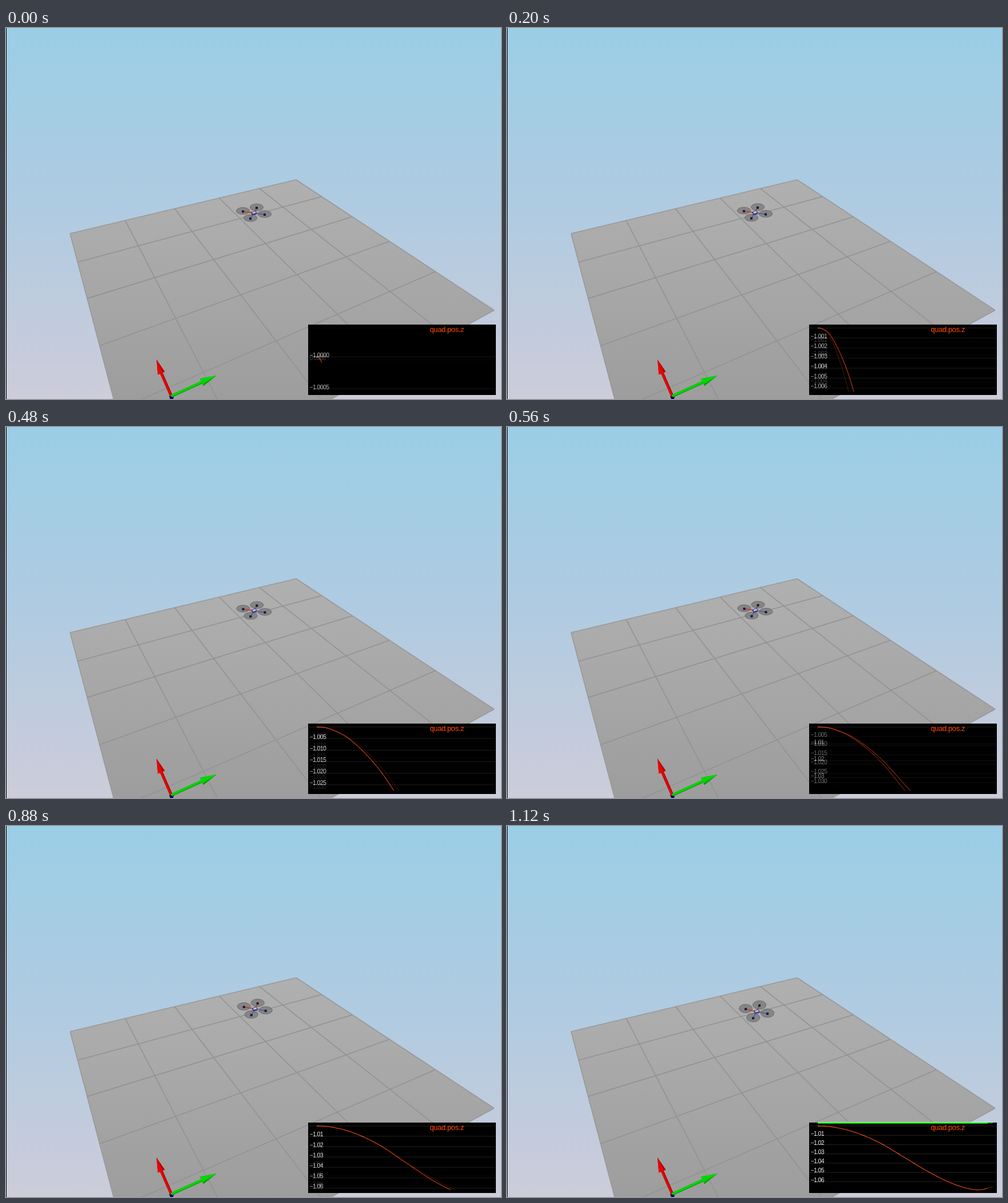
An HTML page with a canvas that plays this animation: 865 px wide and 648 px high, repeating every 1.16 s.

```html
<!DOCTYPE html>
<html lang="en">
<head>
<meta charset="utf-8">
<title>Quadrotor altitude</title>
<style>
html, body { margin: 0; width: 100%; height: 100%; overflow: hidden; background: #000; }
canvas { display: block; }
</style>
</head>
<body>
<canvas id="stage" width="865" height="648"></canvas>
<script>
const W = 865, H = 648, STEP = 40, COUNT = 29;
const ctx = document.getElementById('stage').getContext('2d');

// Smooth curve through [x, y] points
function curve(points) {
  const last = points.length - 1;
  const slope = i => {
    const a = points[Math.max(i - 1, 0)], b = points[Math.min(i + 1, last)];
    return (b[1] - a[1]) / (b[0] - a[0]);
  };
  return x => {
    let i = 0;
    while (i < last - 1 && x > points[i + 1][0]) i++;
    const [x0, y0] = points[i], [x1, y1] = points[i + 1];
    const w = x1 - x0, t = (x - x0) / w, t2 = t * t, t3 = t2 * t;
    const m0 = i ? slope(i) : 0, m1 = slope(i + 1);
    return y0 * (2 * t3 - 3 * t2 + 1) + y1 * (3 * t2 - 2 * t3) +
      w * (m0 * (t3 - 2 * t2 + t) + m1 * (t3 - t2));
  };
}

const climb = curve([[0, 0], [3, .00115], [7, .00637], [12, .018], [17, .0344],
  [22, .0509], [27, .0638], [31, .0688], [34, .0658]]);
const shiftX = curve([[0, 0], [7, .1], [12, .2], [18, .6], [22, 1.1], [27, 1.9], [34, 3.3]]);
const shiftBack = curve([[0, 0], [7, -.5], [12, -1.5], [18, -3], [22, -4.1], [27, -4.2], [34, -.3]]);
const shiftFront = curve([[0, 0], [7, -.5], [12, -1.4], [18, -2.6], [22, -3], [27, -2.3], [34, 3.2]]);

// Simulation tick shown at picture n; fractions blend two ticks
function tickAt(n) {
  if (n < 14) return .75 + 1.2 * n;
  if (n < 18) return 17.55 + .9625 * (n - 14);
  return 21.4 + 1.2 * (n - 18);
}

function poly(points, fill, stroke, width = 1) {
  ctx.beginPath();
  points.forEach(([x, y]) => ctx.lineTo(x, y));
  if (fill) { ctx.closePath(); ctx.fillStyle = fill; ctx.fill(); }
  if (stroke) { ctx.strokeStyle = stroke; ctx.lineWidth = width; ctx.stroke(); }
}

function gradient(y0, y1, ...colors) {
  const g = ctx.createLinearGradient(0, y0, 0, y1);
  colors.forEach((c, i) => g.addColorStop(i / (colors.length - 1), c));
  return g;
}

// Perspective map from the unit square to the floor
function projector([[x0, y0], [x1, y1], [x2, y2], [x3, y3]]) {
  const dx1 = x1 - x2, dy1 = y1 - y2, dx2 = x3 - x2, dy2 = y3 - y2;
  const sx = x0 - x1 + x2 - x3, sy = y0 - y1 + y2 - y3;
  const den = dx1 * dy2 - dx2 * dy1;
  const g = (sx * dy2 - dx2 * sy) / den, h = (dx1 * sy - sx * dy1) / den;
  return (u, v) => {
    const w = 1 + g * u + h * v;
    return [
      (x0 + (x1 - x0 + g * x1) * u + (x3 - x0 + h * x3) * v) / w,
      (y0 + (y1 - y0 + g * y1) * u + (y3 - y0 + h * y3) * v) / w
    ];
  };
}

const corners = [[112, 359], [507, 265], [853, 493], [235.6, 829]];
const floorAt = projector(corners);

function drawFloor() {
  poly(corners, gradient(265, 648, '#b0b0b0', '#a7a7a7', '#9d9d9d'));
  for (let i = 0; i <= 5; i++) {
    const t = i / 5, color = i % 5 ? '#929292' : '#999999';
    poly([floorAt(t, 0), floorAt(t, 1)], null, color, 1.6);
    poly([floorAt(0, t), floorAt(1, t)], null, color, 1.6);
  }
}

function drawArrow(base, neck, tip, half, light, dark) {
  const len = Math.hypot(tip[0] - base[0], tip[1] - base[1]);
  const nx = -(tip[1] - base[1]) / len, ny = (tip[0] - base[0]) / len;
  const off = ([x, y], d) => [x + nx * d, y + ny * d];
  poly([base, neck], null, dark, 5);
  poly([off(base, -.6), off(neck, -.6)], null, light, 3.2);
  poly([off(neck, half), tip, off(neck, -half)], dark);
  poly([off(neck, half * .45), tip, off(neck, -half)], light);
}

function drawAxes() {
  poly([[285, 643], [289, 641], [293, 644], [292, 648], [287, 648]], '#00006e');
  drawArrow([289, 643], [271.5, 603], [263, 579], 6.6, '#e60505', '#b00000');
  drawArrow([289, 643], [342, 619], [368, 607], 7.2, '#05d605', '#08a408');
}

function drawDrone(k) {
  const dx = shiftX(k), back = shiftBack(k), front = shiftFront(k);
  const mid = (back + front) / 2;
  const grow = Math.max(0, k - 22) / 12;
  const rotors = [
    [414 + dx, 319.5 + back], [438 + dx, 313.2 + back],
    [452 + dx, 325 + (mid + front) / 2], [427 + dx, 332 + front]
  ];
  const body = [433 + dx, 323 + mid];
  for (const [x, y] of rotors) {
    ctx.beginPath();
    ctx.ellipse(x, y, 11.6, 6 + grow * 1.5, 0, 0, 7);
    ctx.fillStyle = 'rgba(126,126,126,.85)';
    ctx.fill();
    ctx.strokeStyle = '#6c6c6c';
    ctx.lineWidth = 1;
    ctx.stroke();
  }
  rotors.forEach(([x, y], i) => {
    poly([[x, y + 1], body], null, i < 2 ? '#b8442f' : '#5a629c', 1.8);
    ctx.fillStyle = '#17174c';
    ctx.fillRect(x - 2, y - 1, 4, 4);
  });
  const [x, y] = body;
  poly([[x - 5, y - 1], [x + 2, y - 4], [x + 5, y - 1], [x + 4, y + 3], [x - 3, y + 4]], '#35377e');
  poly([[x - 3, y - 1], [x + 2, y - 3], [x + 4, y], [x - 2, y + 1.6]], '#bfc4e2');
}

function drawPlot(k, alpha) {
  const left = 543, top = 524, height = 111.5, perTick = 9;
  let drop = 0;
  for (let i = 0; i <= k; i++) drop = Math.max(drop, climb(i));
  const range = Math.max(drop, .001);
  const zMax = (k ? -1 : 0) - drop / 2 + range / 2;
  const yOf = z => top + (zMax - z) / range * height;
  ctx.globalAlpha = alpha;

  let step = .0001;
  for (let i = 0; range / step > 7; i++) step *= i % 2 ? 2 : 5;
  const digits = -Math.floor(Math.log10(step) + 1e-6);
  const first = Math.floor(zMax / step + 1e-6);
  ctx.font = '10.5px "Liberation Sans", Arial, sans-serif';
  ctx.letterSpacing = '-0.6px';
  for (let i = first; yOf(i * step) < top + height - .1; i--) {
    const y = yOf(i * step);
    ctx.fillStyle = '#202020';
    ctx.fillRect(529, y - .5, 326, 1);
    if (y < 532) continue;
    ctx.fillStyle = '#ededed';
    ctx.fillText((i < 0 ? '−' : '') + Math.abs(i * step).toFixed(digits), 530.5, y + .4);
  }

  const line = [];
  for (let t = 0; t <= k; t += .25) line.push([left + perTick * t, yOf(-1 - climb(t))]);
  if (k) poly(line, null, '#d2400f', 1.3);
  if (k >= 31) {
    ctx.fillStyle = '#00e000';
    ctx.fillRect(left, 517.5, perTick * k, 2.5);
  }
  ctx.font = '13px "Liberation Sans", Arial, sans-serif';
  ctx.letterSpacing = '-0.4px';
  ctx.fillStyle = '#ff4500';
  ctx.fillText('quad.pos.z', 740.5, 530.5);
}

function drawPanel(s) {
  const k = Math.floor(s), mix = s - k;
  ctx.fillStyle = '#000';
  ctx.fillRect(528, 518, 328, 123);
  ctx.save();
  ctx.globalCompositeOperation = 'lighter';
  drawPlot(k, 1 - mix);
  drawPlot(k + 1, mix);
  ctx.restore();
}

function draw(n) {
  const s = tickAt(n);
  ctx.fillStyle = gradient(0, H, '#9acee6', '#b0cbe1', '#cdccda');
  ctx.fillRect(0, 0, W, H);
  drawFloor();
  drawAxes();
  drawDrone(s);
  drawPanel(s);
  ctx.fillStyle = '#000';
  ctx.fillRect(0, 0, 1, H);
}

const start = performance.now();
function tick() {
  const t = Math.max(0, performance.now() - start);
  draw(Math.floor(t / STEP) % COUNT);
  requestAnimationFrame(tick);
}
tick();
</script>
</body>
</html>
```
